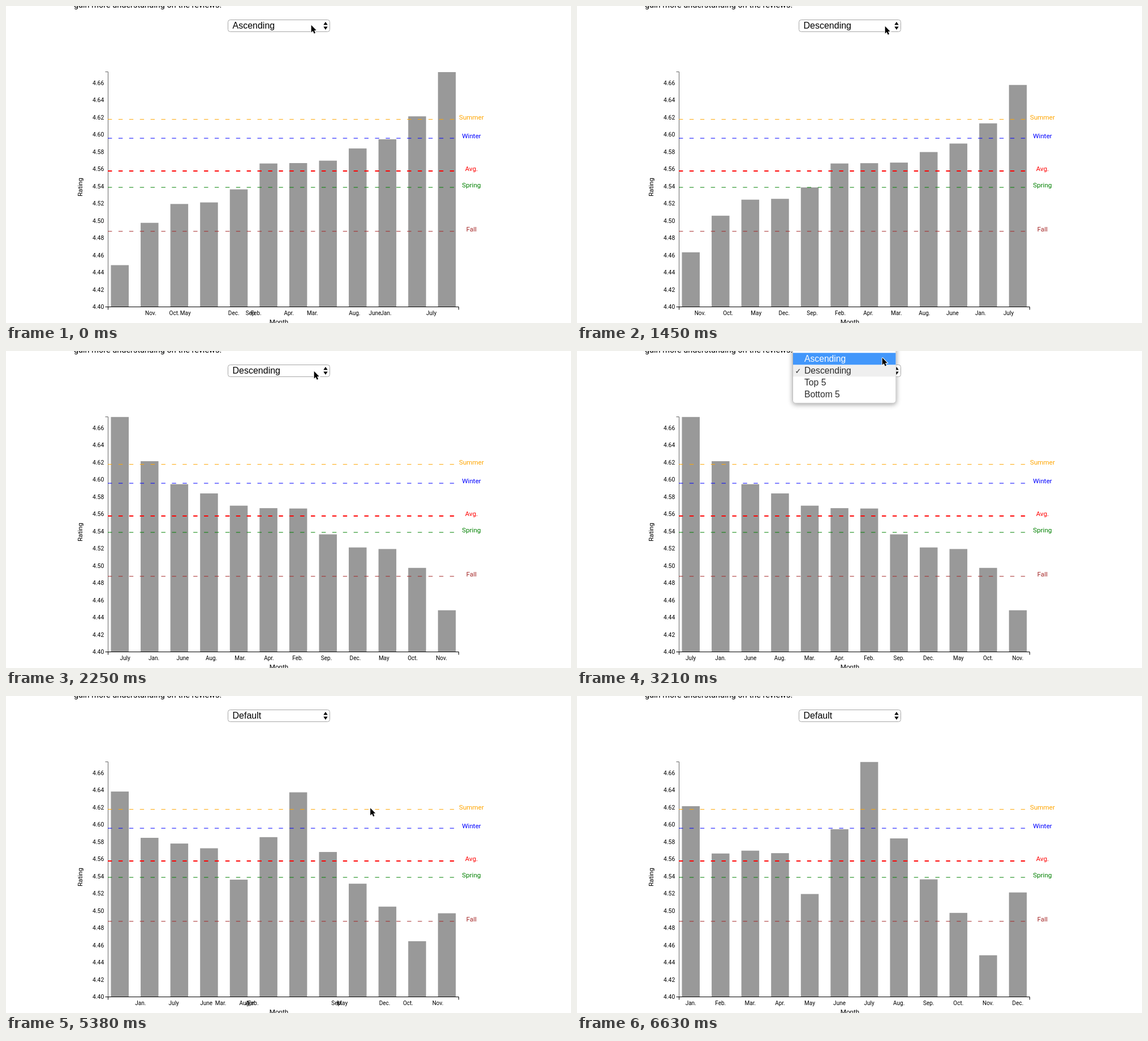
An HTML page with a canvas that plays this animation: 999x561 px, repeating every 7.69 s.

```html
<!DOCTYPE html>
<html lang="en">
<head>
<meta charset="utf-8">
<title>Ratings by month</title>
<style>
  html, body { margin: 0; width: 100%; height: 100%; overflow: hidden; background: #fff; }
  canvas { display: block; }
</style>
</head>
<body>
<canvas id="stage" width="999" height="561"></canvas>
<script>
const ctx = document.getElementById('stage').getContext('2d');
const LOOP = 7690, BASE = 532.5, STEP = 52.57, ROW = 21, FADE = 425;
const SANS = 'Roboto, "Open Sans", sans-serif';
const UI = '"Liberation Sans", Arial, sans-serif';

const ratings = {
  'Jan.': 4.6213, 'Feb.': 4.5664, 'Mar.': 4.5697, 'Apr.': 4.5668, May: 4.5194, June: 4.5946,
  July: 4.6726, 'Aug.': 4.5839, 'Sep.': 4.5364, 'Oct.': 4.4975, 'Nov.': 4.4483, 'Dec.': 4.5212
};
const averages = {
  orange: ['Summer', 4.6176], blue: ['Winter', 4.5957], red: ['Avg.', 4.5577],
  green: ['Spring', 4.5387], brown: ['Fall', 4.4877]
};
const options = ['Default', 'Ascending', 'Descending', 'Top 5', 'Bottom 5'];

const byMonth = Object.keys(ratings);
const ascending = [...byMonth].sort((a, b) => ratings[a] - ratings[b]);
const descending = [...ascending].reverse();

const sorts = [
  { start: -1302, rate: 0.54, from: byMonth, to: ascending, value: 1 },
  { start: 1214, rate: 0.81, from: ascending, to: descending, value: 2 },
  { start: 4958, rate: 1, from: descending, to: byMonth, value: 0 }
];
const menus = [
  { checked: 1, open: 950, close: 865 },
  { checked: 2, open: 2400, close: 4460 }
];

// Pointer moves: start, end, x, y
const moves = [
  [680, 860, 538, 53], [1220, 1450, 544, 35], [2400, 3210, 539, 11], [3390, 3750, 532, 2],
  [4720, 5020, 643, 197], [5380, 5930, 912, 473], [6280, 6630, 945, 570]
];

const clamp = v => Math.min(1, Math.max(0, v));
const lerp = (a, b, p) => a + (b - a) * p;
const ease = v => {
  const p = clamp(v);
  return p < 0.5 ? 4 * p ** 3 : 1 - 4 * (1 - p) ** 3;
};
const ratingY = v => BASE - (v - 4.4) * 1525;
const rowTop = (i, checked) => 24.3 + ROW * (i - checked);
const pointerAt = t => moves.reduce(([px, py], [start, end, x, y]) => {
  const p = clamp((t - start) / (end - start));
  return [lerp(px, x, p), lerp(py, y, p)];
}, [539, 33]);

function text(str, x, y, size, color = '#000', align = 'left', family = SANS) {
  ctx.font = `${size}px ${family}`;
  ctx.textAlign = align;
  ctx.fillStyle = color;
  ctx.fillText(str, x, y);
}

function trace(points) {
  ctx.beginPath();
  points.forEach(([x, y]) => ctx.lineTo(x, y));
}

function shape(points, color) {
  trace(points);
  ctx.fillStyle = color;
  ctx.fill();
}

function line(points, color, width = 1) {
  trace(points);
  ctx.strokeStyle = color;
  ctx.lineWidth = width;
  ctx.stroke();
}

function box(x, y, w, h, r, fill, stroke) {
  ctx.beginPath();
  ctx.roundRect(x, y, w, h, r);
  ctx.fillStyle = fill;
  ctx.fill();
  ctx.strokeStyle = stroke;
  ctx.lineWidth = 1;
  ctx.stroke();
}

function drawChart(t, { start, rate, from, to }) {
  const elapsed = (t - start) * rate;
  const barP = ease(elapsed / 750), labelP = ease(elapsed / 1000);
  from.forEach((name, i) => {
    const top = ratingY(lerp(ratings[name], ratings[to[i]], barP));
    ctx.fillStyle = '#999';
    ctx.fillRect(185.5 + STEP * i, top, 31.5, BASE - top);
    text(name, 201.2 + STEP * lerp(i, to.indexOf(name), labelP), 547, 10, '#000', 'center');
  });

  line([[175.5, 116.5], [180.5, 116.5], [180.5, BASE]], '#666');
  line([[175.5, BASE], [800.5, BASE], [800.5, 537.5]], '#000');
  line([[180.5, BASE], [180.5, 537.5]], '#000');
  for (let i = 0; i < 14; i++) {
    const value = 4.4 + i * 0.02;
    text(value.toFixed(2), 173.3, ratingY(value) + 3.8, 10.4, '#000', 'right');
  }

  for (const [color, [name, value]] of Object.entries(averages)) {
    const y = ratingY(value);
    ctx.setLineDash([7.4, 11.5]);
    line([[180, y], [800, y]], color, name === 'Avg.' ? 2 : 1);
    ctx.setLineDash([]);
    text(name, 823, y, 11.7, color, 'center');
  }

  text('Month', 482.5, 563, 11.7, '#000', 'center');
  ctx.save();
  ctx.translate(135, 320.5);
  ctx.rotate(-Math.PI / 2);
  text('Rating', 0, 0, 11.7, '#000', 'center');
  ctx.restore();
}

function drawSelect(value) {
  box(392.5, 24.5, 180, 21, 4, '#fff', '#a6a6a6');
  text(options[value], 400.5, 40.3, 16, '#000', 'left', UI);
  shape([[561.3, 33.5], [565, 28], [568.7, 33.5]], '#000');
  shape([[561.3, 36.5], [565, 42], [568.7, 36.5]], '#000');
}

function menuPanel(checked, fill, stroke) {
  box(381.5, -20, 182.5, rowTop(5, checked) + 25, 5, fill, stroke);
}

function drawShadow({ checked }, alpha) {
  ctx.save();
  ctx.shadowColor = `rgba(0,0,0,${0.35 * alpha})`;
  ctx.shadowBlur = 9;
  ctx.shadowOffsetY = 2;
  menuPanel(checked, '#fff', '#fff');
  ctx.restore();
}

function drawMenu(t, { checked, close }, alpha) {
  const y = pointerAt(Math.min(t, close))[1];
  const hover = checked + Math.floor((y - rowTop(0, 0)) / ROW);
  const fillRow = (i, color) => {
    ctx.fillStyle = color;
    ctx.fillRect(382, rowTop(i, checked), 181.5, ROW);
  };
  ctx.save();
  ctx.globalAlpha = alpha;
  menuPanel(checked, alpha < 1 ? '#f2f2f2' : '#fff', '#bcbcbc');
  fillRow(checked, '#efefef');
  fillRow(hover, '#4297fb');
  options.forEach((name, i) => {
    const color = i === hover ? '#fff' : '#2c2c2c', baseline = rowTop(i, checked) + 15.3;
    text(name, 402, baseline, 15.7, color, 'left', UI);
    if (i === checked) text('✓', 385.5, baseline, 13, color, 'left', '"DejaVu Sans", sans-serif');
  });
  ctx.restore();
}

function drawPointer(t) {
  const [x, y] = pointerAt(t);
  const arrow = [[0, 0], [0, 13], [3, 10.3], [5, 15], [7.3, 14], [5.3, 9.5], [9, 9.3], [0, 0]];
  ctx.save();
  ctx.translate(x + 0.7, y + 0.7);
  line(arrow, '#fff', 2);
  shape(arrow, '#000');
  ctx.restore();
}

function draw(t) {
  ctx.fillStyle = '#fff';
  ctx.fillRect(0, 0, 999, 561);
  const sort = sorts.findLast(s => s.start <= t);
  const menu = menus.findLast(m => m.open <= t);
  const alpha = menu ? clamp(1 - (t - menu.close) / FADE) : 0;
  text('gain more understanding on the reviews.', 120, 2.5, 14.5);
  drawChart(t, sort);
  if (alpha) drawShadow(menu, alpha);
  drawSelect(sort.value);
  if (alpha) drawMenu(t, menu, alpha);
  drawPointer(t);
}

const begin = performance.now();
function tick() {
  draw((performance.now() - begin) % LOOP);
  requestAnimationFrame(tick);
}
tick();
</script>
</body>
</html>
```
